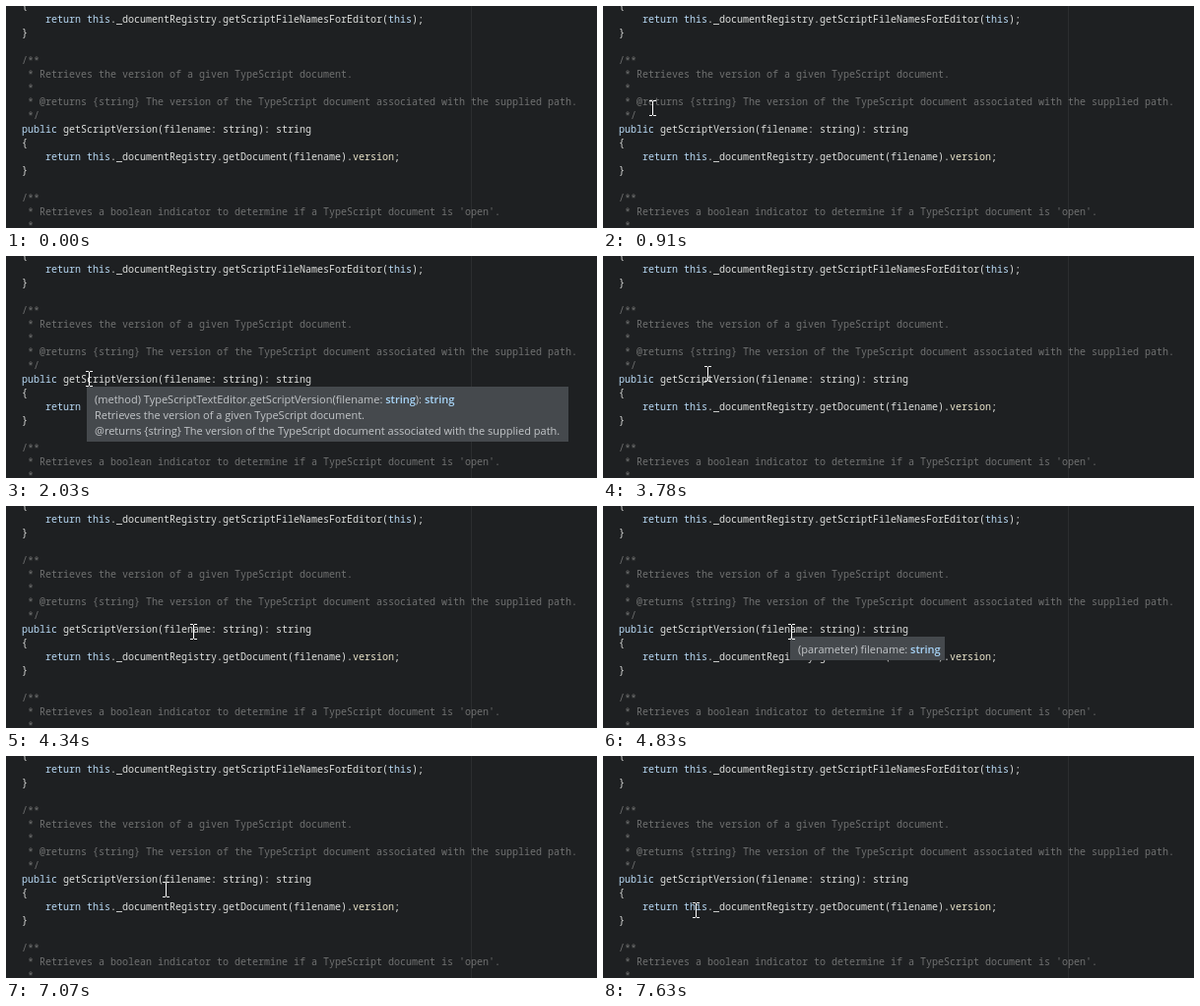
An HTML page that plays this animation: 600 px wide and 226 px high, repeating every 8 s.

```html
<!DOCTYPE html>
<html lang="en">
<head>
<meta charset="utf-8">
<title>Hover help in a code editor</title>
<style>
html, body { margin: 0; width: 100%; height: 100%; overflow: hidden; background: #1e2022; }
svg { display: block; width: 600px; height: 226px; }
text { white-space: pre; }
#code { font: 500 10px "Noto Sans Mono", monospace; fill: #dedfdd; }
#code .comment { font-weight: 400; fill: #707171; }
#code .keyword { fill: #b8d9f5; }
#code .member { fill: #ebe5cb; }
.tip { font: 11px "Open Sans", sans-serif; fill: #c3c6c9; }
.tip rect { fill: #45494d; }
.tip .type { font-weight: 600; fill: #a8d6fa; }
</style>
</head>
<body>
<svg viewBox="0 0 600 226">
  <rect width="600" height="226" fill="#1e2022"/>
  <rect x="472" width="1" height="226" fill="#2b2d2f"/>
  <g id="code"></g>
  <g id="methodTip" class="tip"></g>
  <g id="paramTip" class="tip"></g>
  <path id="cursor" fill="#fff" d="M0 0h3v1h-3z M4 0h3v1h-3z M3 1h1v14h-1z M0 15h3v1h-3z M4 15h3v1h-3z"/>
</svg>
<script>
const LOOP = 8000, TICK = 70;
const $ = id => document.getElementById(id);

const lines = [
  "{",
  "    return this._documentRegistry.getScriptFileNamesForEditor(this);",
  "}",
  "",
  "/**",
  " * Retrieves the version of a given TypeScript document.",
  " *",
  " * @returns {string} The version of the TypeScript document associated with the supplied path.",
  " */",
  "public getScriptVersion(filename: string): string",
  "{",
  "    return this._documentRegistry.getDocument(filename).version;",
  "}",
  "",
  "/**",
  " * Retrieves a boolean indicator to determine if a TypeScript document is 'open'.",
  " *"
];

const span = (cls, s) => `<tspan class="${cls}">${s}</tspan>`;

function colour(code) {
  if (/^(\*|\/\*)/.test(code)) return span("comment", code);
  return code
    .replace(/\b(public|return|this)\b/g, s => span("keyword", s))
    .replace(/\bversion\b/, s => span("member", s));
}

$("code").innerHTML = lines.map((line, i) => {
  const indent = line.search(/\S|$/);
  return `<text x="${16 + indent * 6}" y="${3 + i * 14}">${colour(line.slice(indent))}</text>`;
}).join("");

function buildTip(id, x, y, w, h, rows) {
  $(id).innerHTML =
    `<rect x="${x}" y="${y}" width="${w}" height="${h}"/>` +
    rows.map((row, i) => `<text x="${x + 8}" y="${y + 17 + i * 16}">${row}</text>`).join("");
}

const type = span("type", "string");
buildTip("methodTip", 82, 133, 489, 56, [
  `(method) TypeScriptTextEditor.getScriptVersion(filename: ${type}): ${type}`,
  "Retrieves the version of a given TypeScript document.",
  "@returns {string} The version of the TypeScript document associated with the supplied path."
]);
buildTip("paramTip", 190, 133, 157, 24, [`(parameter) filename: ${type}`]);

const easeOut = p => 1 - (1 - p) ** 2;
const easeInOut = p => p * p * (3 - 2 * p);

// Pointer moves: start, end, from, to, easing
const moves = [
  [630, 1400, [-2, 69], [80, 115], easeOut],
  [1470, 1610, [80, 115], [81, 117], p => p],
  [3780, 4410, [103, 112], [188, 120], easeOut],
  [6790, 7560, [187, 120], [94, 148], easeInOut],
  [7560, 7630, [94, 148], [91, 149], p => p]
];

const show = (id, on) => $(id).setAttribute("visibility", on ? "visible" : "hidden");

function draw(time) {
  const t = Math.floor(time / TICK) * TICK;
  const move = moves.filter(m => t >= m[0]).pop();
  show("cursor", move);
  if (move) {
    const [start, end, from, to, ease] = move;
    const p = ease(Math.min(1, (t - start) / (end - start)));
    const [x, y] = from.map((a, i) => Math.round(a + (to[i] - a) * p));
    $("cursor").setAttribute("transform", `translate(${x} ${y})`);
  }
  show("methodTip", t >= 2030 && t < 3780);
  show("paramTip", t >= 4830 && t < 6930);
}

const began = performance.now();
function frame() {
  draw((performance.now() - began) % LOOP);
  requestAnimationFrame(frame);
}
frame();
</script>
</body>
</html>
```
